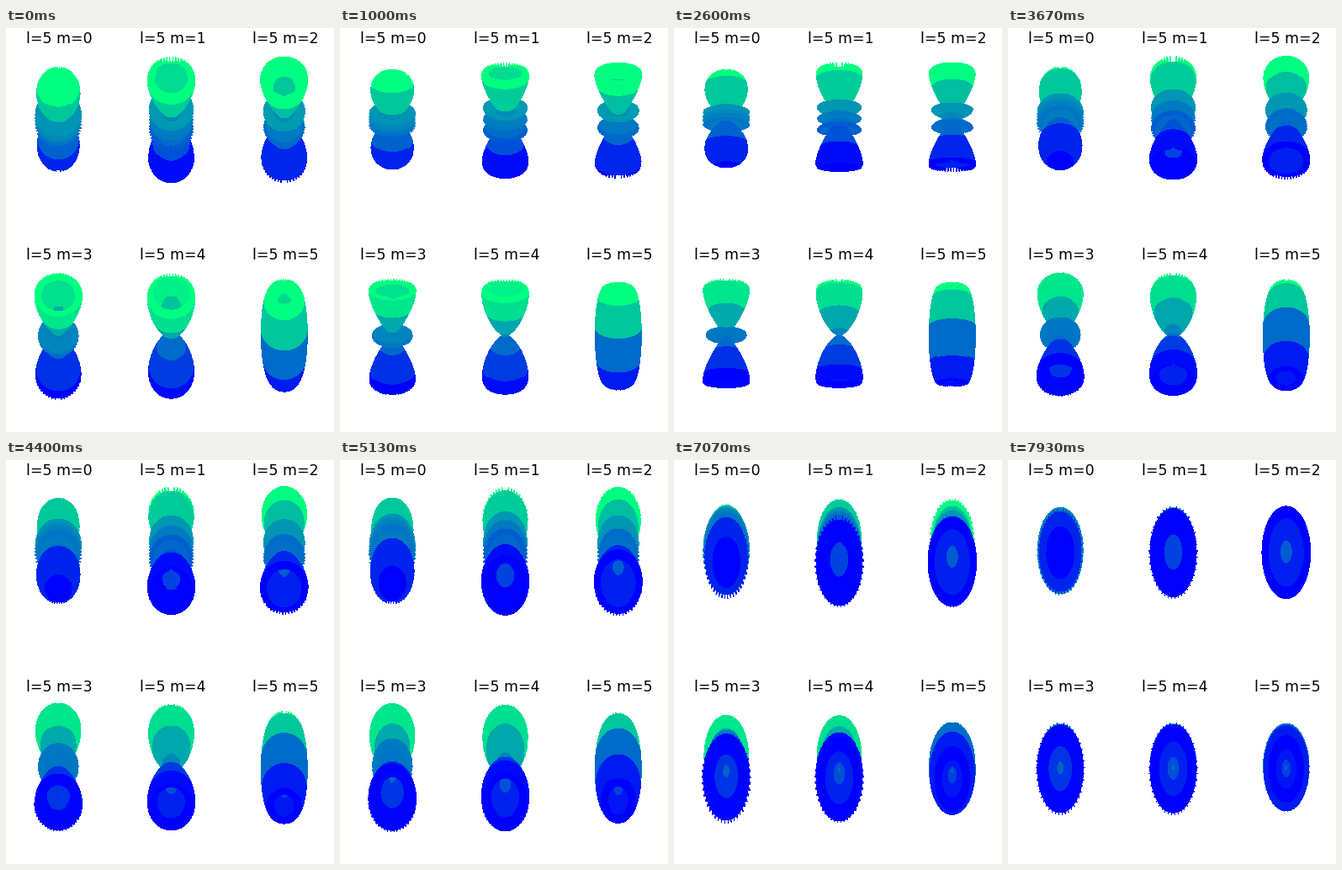
Write a matplotlib script that moves like this. It is 390 px wide and 480 px high and loops after 8000 ms.

```python
import numpy as np
import matplotlib.pyplot as plt
from matplotlib.animation import FuncAnimation
from matplotlib.collections import PolyCollection

W, H, DPI = 390, 480, 100
FRAMES = 120
DIST = 10                    # camera distance in box units
SX, SY = 60.5, 115.3         # pixels per box unit
STEP, S = 2, 4               # grid step in degrees, steps per patch
NB, NC = 23, 45              # patches from pole to pole and around

fig = plt.figure(figsize=(W / DPI, H / DPI), dpi=DPI, facecolor="white")
ax = fig.add_axes([0, 0, 1, 1])
ax.set_xlim(0, W)
ax.set_ylim(0, H)
ax.axis("off")

# associated Legendre functions for l = 5, up to a constant factor
LEGENDRE = [
    lambda c, s: (63 * c**5 - 70 * c**3 + 15 * c) / 8,
    lambda c, s: s * (21 * c**4 - 14 * c**2 + 1),
    lambda c, s: s**2 * (3 * c**3 - c),
    lambda c, s: s**3 * (9 * c**2 - 1),
    lambda c, s: s**4 * c,
    lambda c, s: s**5,
]

# the last band is cut short at the bottom pole
polar = np.radians(np.minimum(np.arange(NB * S + 1) * STEP, 180))
turn = np.radians(np.arange(NC * S + 1) * STEP)


def surface(m):
    c, s = np.cos(polar), np.sin(polar)
    r = LEGENDRE[m](c, s) ** 2
    rho, z = r * s, r * c
    rho = rho / rho.max() / 2.2
    z = z / np.ptp(z)
    return (np.outer(rho, np.cos(turn)), np.outer(rho, np.sin(turn)),
            np.outer(z, np.ones_like(turn)))


RING = ([(0, j) for j in range(S)] + [(i, S) for i in range(S)]
        + [(S, S - j) for j in range(S)] + [(S - i, 0) for i in range(S)])


def patches(a):
    """Perimeter points of every S x S block of cells."""
    return np.stack([a[:, i::S, j::S][:, :NB, :NC] for i, j in RING], axis=3)


X, Y, Z = (np.array(a) for a in zip(*(surface(m) for m in range(6))))
cols, rows = np.arange(6) % 3, np.arange(6) // 3
CX = (62.2 + 134.3 * cols)[:, None, None]
CY = (H - 108 - 257.2 * rows)[:, None, None]

height = patches(Z).mean(axis=3)
low = height.min(axis=(1, 2), keepdims=True)
high = height.max(axis=(1, 2), keepdims=True)
COLORS = plt.get_cmap("winter")((height - low) / (high - low))

for m in range(6):
    ax.text(63.4 + 134.5 * cols[m], H - 18 - 257 * rows[m], f"l=5 m={m}",
            family="DejaVu Sans", size=12.5, ha="center", va="baseline")

shapes = PolyCollection([], linewidths=0, edgecolors="none", antialiaseds=False)
ax.add_collection(shapes, autolim=False)


def update(i):
    elev = np.radians(30 - i)
    ce, se = np.cos(elev), np.sin(elev)
    depth = X * ce + Z * se
    zoom = DIST / (DIST - depth)
    px = CX + SX * Y * zoom
    py = CY + SY * (Z * ce - X * se) * zoom

    # keep only patches with some cell turned to the viewer
    ax1, ay1 = (p[:, 1:, 1:] - p[:, :-1, :-1] for p in (px, py))
    ax2, ay2 = (p[:, 1:, :-1] - p[:, :-1, 1:] for p in (px, py))
    area = ay1 * ax2 - ax1 * ay2
    seen = (area < -0.002).reshape(6, NB, S, NC, S).any(axis=(2, 4))
    seen = (area > 0.002).reshape(6, NB, S, NC, S).any(axis=(2, 4))

    verts = np.stack([patches(px)[seen], patches(py)[seen]], axis=-1)
    order = np.argsort(patches(depth)[seen].mean(axis=1))
    shapes.set_verts(verts[order])
    shapes.set_facecolor(COLORS[seen][order])
    return [shapes]


anim = FuncAnimation(fig, update, frames=FRAMES, interval=8000 / FRAMES,
                     repeat=True, repeat_delay=0)
plt.show()
```
